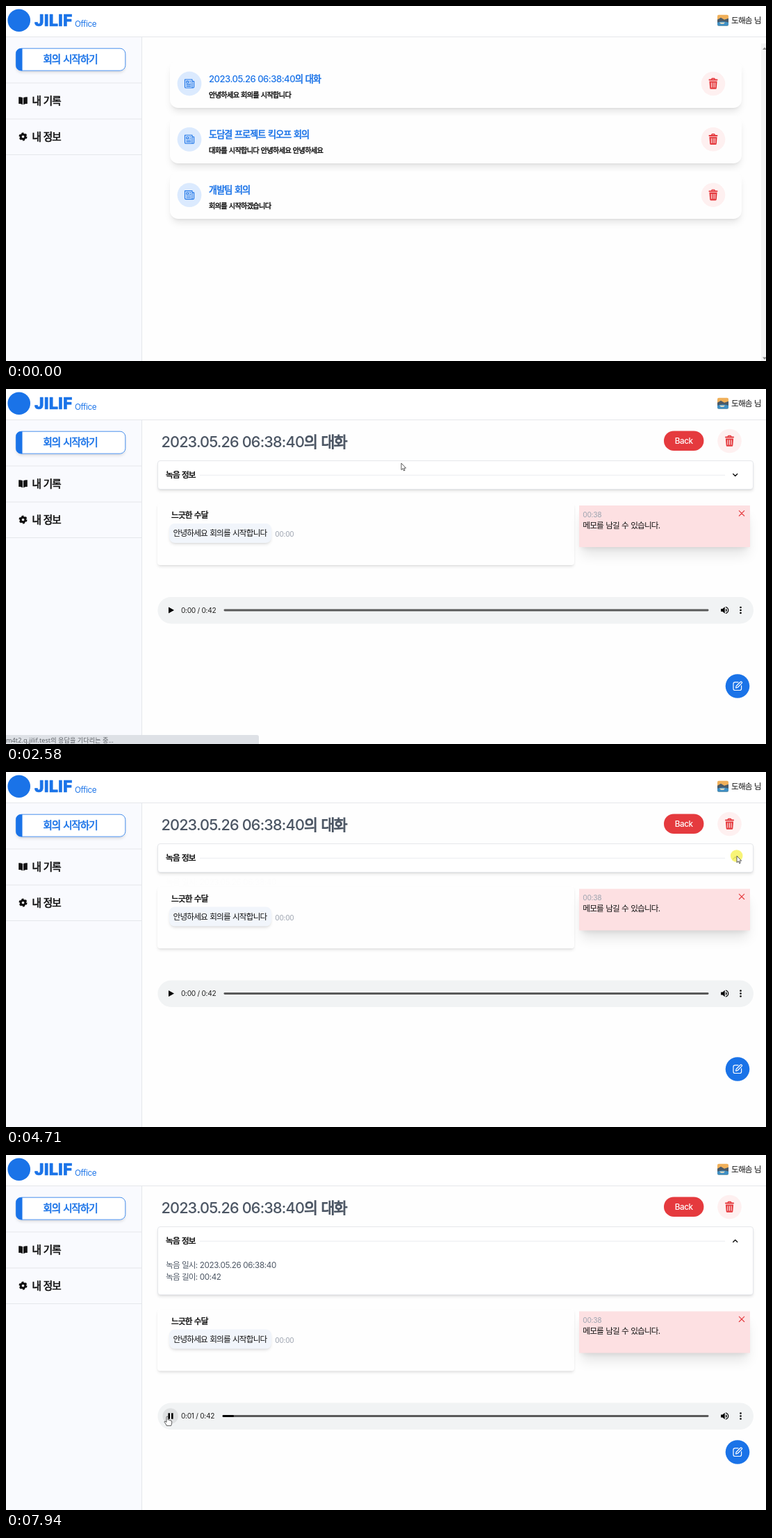
An HTML page that plays this animation: 1094 px wide and 512 px high, repeating every 8000 ms.

```html
<!DOCTYPE html>
<html lang="ko">
<head>
<meta charset="utf-8">
<title>Meeting records</title>
<style>
html, body { margin: 0; width: 100%; height: 100%; overflow: hidden; background: #fefefe; }
#stage { position: relative; width: 1094px; height: 512px; overflow: hidden; }
#stage div, #stage svg { position: absolute; box-sizing: border-box; }
#stage svg, .layer { left: 0; top: 0; width: 1094px; height: 512px; }
text { font-family: Inter, 'Noto Sans CJK KR', 'Noto Sans CJK', sans-serif; letter-spacing: -.03em; }
.k { letter-spacing: -.07em; word-spacing: .06em; }
.strong { font-weight: 500; letter-spacing: -.04em; }
.strong .k { font-weight: 400; stroke-width: .045em; }
.plain, .plain .k { font-family: 'Noto Sans', 'Noto Sans CJK KR', sans-serif; letter-spacing: 0; word-spacing: 0; }
.md { box-shadow: 0 2.9px 4.4px -.7px rgba(0,0,0,.1), 0 1.5px 2.9px -1.5px rgba(0,0,0,.1); }
.lg { box-shadow: 0 7.3px 11px -2.2px rgba(0,0,0,.1), 0 2.9px 4.4px -2.9px rgba(0,0,0,.1); }
.xl { box-shadow: 0 14.6px 18.2px -3.6px rgba(0,0,0,.1), 0 5.8px 7.3px -4.4px rgba(0,0,0,.1); }
</style>
</head>
<body>
<div id="stage"></div>
<script>
const BLUE = '#1a73e8', RED = '#e53a3e', LINE = '#e5e7eb', GRAY = '#4b5563', PALE = '#9ca3af', INK = '#111';
const BASE = 11.65, SMALL = 10.2, XL = 14.56;
const SHIFT = 57.5;

// Markup helpers
const svg = body => `<svg viewBox="0 0 1094 512">${body}</svg>`;
const box = (x, y, w, h, css, attrs = '') =>
  `<div ${attrs} style="left:${x}px;top:${y}px;width:${w}px;height:${h}px;${css}"></div>`;
const rect = (x, y, w, h, fill, attrs = '') =>
  `<rect x="${x}" y="${y}" width="${w}" height="${h}" fill="${fill}" ${attrs}/>`;
const disc = (x, y, r, fill, attrs = '') => `<circle cx="${x}" cy="${y}" r="${r}" fill="${fill}" ${attrs}/>`;
const path = (d, fill, attrs = '') => `<path d="${d}" fill="${fill}" ${attrs}/>`;
const stroke = (d, color, width) =>
  path(d, 'none', `stroke="${color}" stroke-width="${width}" stroke-linecap="round" stroke-linejoin="round"`);
const at = (x, y, body, attrs = '') => `<g transform="translate(${x} ${y})" ${attrs}>${body}</g>`;
// Text is placed by its visual middle; Hangul runs are set tighter
const label = (x, mid, size, str, fill = INK, style = '', attrs = '') => {
  const edge = style === 'strong' ? `stroke="${fill}"` : '';
  const runs = str.replace(/[가-힣]+( [가-힣]+)*/g, run => `<tspan class="k" ${edge}>${run}</tspan>`);
  return `<text x="${x}" y="${mid + size * .37}" font-size="${size}" fill="${fill}" class="${style}" ${attrs}>${runs}</text>`;
};

// Icons, centred on 0,0
const trash = back =>
  disc(0, 0, 17.3, back) +
  stroke('M-2.4 -6.3L-1.6 -7.5H1.6L2.4 -6.3', RED, 1.4) +
  rect(-6.5, -6.4, 13, 2, RED, 'rx="1"') +
  path('M-5.6 -3.6H5.6L4.8 6.4Q4.7 7.8 3.4 7.8H-3.4Q-4.7 7.8 -4.8 6.4Z', RED) +
  stroke('M-2.6 -1.2V5.2M0 -1.2V5.2M2.6 -1.2V5.2', back, 1);
const news =
  disc(0, 0, 17.4, '#dbeafe') +
  stroke('M-6.5 -6H4V4.6Q4 6 5.3 6H-5.2Q-6.5 6 -6.5 4.7ZM4 -3.5H6.6V4.6Q6.6 6 5.3 6' +
    'M-4.2 -3.6H-1.4V-.8H-4.2ZM.4 -3.5H2M.4 -1H2M-4.2 1.4H2M-4.2 3.6H2', BLUE, 1.1);
const book =
  path('M-.5 -4.6Q-3 -6 -6.3 -5.5V4.3Q-3 4 -.5 5.6ZM.5 -4.6Q3 -6 6.3 -5.5V4.3Q3 4 .5 5.6Z', INK);
const gear =
  disc(0, 0, 3.3, 'none', `stroke="${INK}" stroke-width="3"`) +
  disc(0, 0, 5, 'none', `stroke="${INK}" stroke-width="2" stroke-dasharray="2.9 2.336"`);
const edit =
  disc(0, 0, 17.3, BLUE) +
  stroke('M1 -5.6H-3.6Q-6 -5.6 -6 -3.4V3.8Q-6 6 -3.8 6H3.4Q5.6 6 5.6 3.8V-.6' +
    'M-2.4 2.6L-1.9 0L4.4 -6.2Q5.4 -6.8 6.2 -5.9T6 -4.2L.1 2Z', '#fff', 1.2);
const speaker =
  path('M-5.6 -1.9H-3.2L0 -4.8V4.8L-3.2 1.9H-5.6Z', '#000') +
  path('M1.3 -2.6Q3 -1.6 3 0T1.3 2.6Z', '#000') +
  stroke('M1.6 -4.5Q5 -3.2 5 0T1.6 4.5', '#000', 1.2);
const avatar =
  rect(-8, -8, 16, 16, '#f0b05a', 'rx="2"') +
  path('M-8 -1L-3 -4L2 -1L8 -3V4H-8Z', '#4a5a68') +
  path('M-8 3Q0 0 8 3V6Q8 8 6 8H-6Q-8 8 -8 6Z', '#3f8fc4') +
  path('M-5 3H3L1 5H-3Z', '#f3e2c0');

// Header and sidebar
const frame =
  box(0, 0, 1094, 44.5, `background:#fff;border-bottom:1px solid ${LINE}`) +
  box(0, 44.5, 196, 468, `background:#f9fafe;border-right:1px solid ${LINE}`) +
  box(14, 61, 158, 32.5, 'background:#fff;border-radius:8px', 'class="md"') +
  svg(
    rect(14.4, 61.2, 157.4, 32, '#fff', `rx="7.6" stroke="${BLUE}" stroke-width=".8"`) +
    path('M23.5 61.2H22Q14.4 61.2 14.4 68.8V85.6Q14.4 93.2 22 93.2H23.5Z', BLUE) +
    disc(18.7, 20.7, 16.3, BLUE) +
    `<text x="41" y="29" font-size="24" font-weight="900" fill="${BLUE}" stroke="${BLUE}" stroke-width=".6"
      stroke-linejoin="round" style="font-family:Roboto,sans-serif;letter-spacing:0">JILIF</text>` +
    label(99, 25.3, BASE, 'Office', BLUE) +
    at(1032, 20.8, avatar) +
    label(1044, 21, BASE, '도해솜 님') +
    label(53.5, 77, XL, '회의 시작하기', BLUE, 'strong') +
    [110.5, 162.5, 214].map(y => rect(0, y, 195, 1, LINE)).join('') +
    at(24.5, 136.8, book) + label(37.5, 136.5, XL, '내 기록', INK, 'strong') +
    at(24.5, 188.5, gear) + label(37.5, 188.3, XL, '내 정보', INK, 'strong'));

// List of records
const DATE = '2023.05.26 06:38:40', GREETING = '안녕하세요 회의를 시작합니다';
const records = [
  [DATE + '의 대화', GREETING],
  ['도담결 프로젝트 킥오프 회의', '대화를 시작합니다 안녕하세요 안녕하세요'],
  ['개발팀 회의', '회의를 시작하겠습니다']
];
const cardTop = i => 78 + i * 80.3, CARD_H = 68.6;
const list = '<div id="list" class="layer">' +
  records.map((r, i) => box(235.5, cardTop(i), 823, CARD_H, 'border-radius:11.65px', 'class="lg card"')).join('') +
  svg(records.map(([title, note], i) => at(0, cardTop(i) - 78,
    at(264, 112, news) +
    label(292, 104.7, 13.1, title, BLUE, 'strong') +
    label(292, 128, SMALL, note, INK, 'strong') +
    at(1018, 112, trash('#fef0f0')))).join('') +
    rect(1087, 54, 7, 458, '#f3f3f3') +
    path('M1089 63L1092 59.5L1095 63Z', '#8a8a8a') + path('M1089 506.5L1092 510L1095 506.5Z', '#8a8a8a')) +
  '</div>';

// One record
const detail = '<div id="detail" class="layer">' +
  box(218.3, 103, 857.5, 41.5, `background:#fff;border:.7px solid ${LINE};border-radius:4px`, 'id="info" class="md"') +
  svg(
    rect(947, 60.4, 57.4, 28.6, RED, 'rx="14.3"') +
    label(223.5, 75.5, 21.7, DATE + '의 대화', GRAY, 'strong') +
    label(975.7, 74.8, BASE, 'Back', '#fff', '', 'text-anchor="middle" font-weight="500"') +
    at(1041.5, 75, trash('#fef0f0')) +
    label(230, 124, BASE, '녹음 정보', INK, 'strong') +
    rect(279, 123.8, 756, .8, LINE) +
    at(1049.7, 124, `<g id="chevron">${stroke('M-3 -1.5L0 1.5L3 -1.5', INK, 1.4)}</g>`) +
    '<g id="facts">' +
      label(230, 158.5, BASE, `녹음 일시: ${DATE}`, GRAY) +
      label(230, 175.5, BASE, '녹음 길이: 00:42', GRAY) +
    '</g>' +
    at(1053, 428.5, edit)) +
  '<div id="talk" class="layer">' +
    box(218.3, 165, 600.2, 88.5, 'background:#fefefe;border-radius:4px', 'class="md"') +
    box(235, 194, 146.5, 28, 'background:#f1f5fb;border-radius:8px', 'class="md"') +
    box(825, 167.5, 245.5, 60.5, 'background:#fde0e2', 'class="xl"') +
    svg(
      rect(218.4, 300, 857.6, 38.4, '#f1f3f4', 'rx="19.2"') +
      label(238, 182, BASE, '느긋한 수달', INK, 'strong') +
      label(240.5, 208, BASE, GREETING) +
      label(387.3, 209.5, SMALL, '00:00', PALE) +
      label(830.3, 181, SMALL, '00:38', PALE) +
      label(830.3, 196.5, BASE, '메모를 남길 수 있습니다.') +
      at(1059, 179.3, stroke('M-3.7 -3.7L3.7 3.7M3.7 -3.7L-3.7 3.7', RED, 1.1)) +
      disc(236.7, 319, 11.2, '#dfe1e2', 'id="halo"') +
      path('M234 314.6L242 319L234 323.4Z', '#000', 'id="play"') +
      path('M233.4 314.8H236V323.2H233.4ZM238 314.8H240.6V323.2H238Z', '#000', 'id="pause"') +
      label(252, 319, SMALL, ' ', '#222', '', 'id="clock"') +
      disc(318, 319, 4, '#d5d6d7', 'id="thumb"') +
      rect(313.5, 317.5, 698, 2.9, '#595959', 'id="track" rx="1.45"') +
      rect(313.5, 317.5, 0, 2.9, '#000', 'id="done" rx="1"') +
      at(1034.7, 319, speaker) +
      [-4, 0, 4].map(d => disc(1057.5, 319 + d, 1.3, '#000')).join('')) +
  '</div></div>';

const status = '<div id="status" class="layer">' +
  box(0, 498.5, 363.5, 14, 'background:#dee1e6;border-radius:0 3px 0 0') +
  svg(label(0, 506.5, 9.2, 'm4t2.q.jilif.test의 응답을 기다리는 중...', '#5f6368', 'plain')) + '</div>';

const pointer = svg('<g id="cursor">' +
  disc(-.3, 0, 8.8, '#f7f368', 'id="click" opacity=".9"') +
  path('M0 0V9.6L2.2 7.6L3.7 10.9L5.2 10.2L3.8 7.1H6.7Z', '#fff', 'id="arrow" stroke="#333" stroke-width=".8"') +
  path('M-1 1.2Q-1 0 .1 0T1.2 1.2V5Q3.2 4.6 3.2 5.6Q5 5.2 5 6.3Q6.6 6 6.6 7.4V9.5Q6.6 11 5.6 13.4H-.8' +
    'Q-1.5 11 -4 8.3Q-4.2 7 -3 7L-1 8.4Z', '#fff', 'id="hand" stroke="#333" stroke-width=".8"') + '</g>');

document.getElementById('stage').innerHTML = frame + list + detail + status + pointer;

const el = {};
document.querySelectorAll('[id]').forEach(e => el[e.id] = e);
const cards = document.querySelectorAll('.card');

const LOOP = 8000, OPEN = 2380, EXPAND = 4700, PLAY = 6400;
const route = [
  [210, 946, 500], [600, 760, 372], [980, 612, 250], [1450, 588, 146], [1840, 570, 110], [1910, 569, 107],
  [2720, 569, 107], [2780, 568.5, 113], [2900, 568.5, 113], [3690, 820, 113], [4000, 1060, 117],
  [4250, 1060, 117], [4500, 1052, 121], [5250, 1052, 121], [5340, 956, 190], [5590, 340, 387],
  [5610, 340, 387], [5700, 337, 392], [6170, 232, 377]
];
const clicks = [2110, EXPAND - 70, PLAY - 70];

const clamp = v => Math.min(1, Math.max(0, v));
const show = (e, on) => { e.style.display = on ? '' : 'none'; };
const set = (e, attrs) => { for (const k in attrs) e.setAttribute(k, attrs[k]); };

function position(t) {
  const i = route.findIndex(p => p[0] > t);
  if (i < 0) return route[route.length - 1].slice(1);
  if (i === 0) return route[0].slice(1);
  const [a, b] = [route[i - 1], route[i]];
  const k = (t - a[0]) / (b[0] - a[0]);
  return [a[1] + (b[1] - a[1]) * k, a[2] + (b[2] - a[2]) * k];
}

function render(t) {
  const [x, y] = position(t);
  const seen = t >= 210, opened = t >= OPEN;

  show(el.list, !opened);
  show(el.detail, opened);
  show(el.status, opened && t < 2645);
  cards.forEach((c, i) => {
    const over = seen && x < 1058 && y >= cardTop(i) && y <= cardTop(i) + CARD_H;
    c.style.background = over ? '#eff6ff' : '#fefefe';
  });

  const p = clamp((t - EXPAND) / 200), k = p * p * (3 - 2 * p);
  el.info.style.height = 41.5 + SHIFT * k + 'px';
  el.talk.style.transform = `translateY(${SHIFT * k}px)`;
  el.facts.style.opacity = k;
  el.chevron.setAttribute('transform', `scale(1 ${t < EXPAND ? 1 : -1})`);

  const playing = t >= PLAY, second = t >= 7740;
  show(el.halo, t >= 6130);
  show(el.play, !playing);
  show(el.pause, playing);
  show(el.thumb, t >= 5560 && t < 5850);
  el.clock.textContent = `0:0${second ? 1 : 0} / 0:42`;
  const left = second ? 311.7 : 313.5;
  set(el.track, { x: left, width: 1011.5 - left });
  set(el.done, { x: left, width: t < 7030 ? 0 : 7 + 9.2 * clamp((t - 7170) / 770) });

  const hand = t >= 5540;
  show(el.cursor, seen);
  show(el.arrow, !hand);
  show(el.hand, hand);
  show(el.click, clicks.some(c => t >= c && t < c + 200));
  el.cursor.setAttribute('transform', `translate(${x} ${y})`);
}

const start = performance.now();
function tick() {
  render((performance.now() - start) % LOOP);
  requestAnimationFrame(tick);
}
tick();
</script>
</body>
</html>
```
